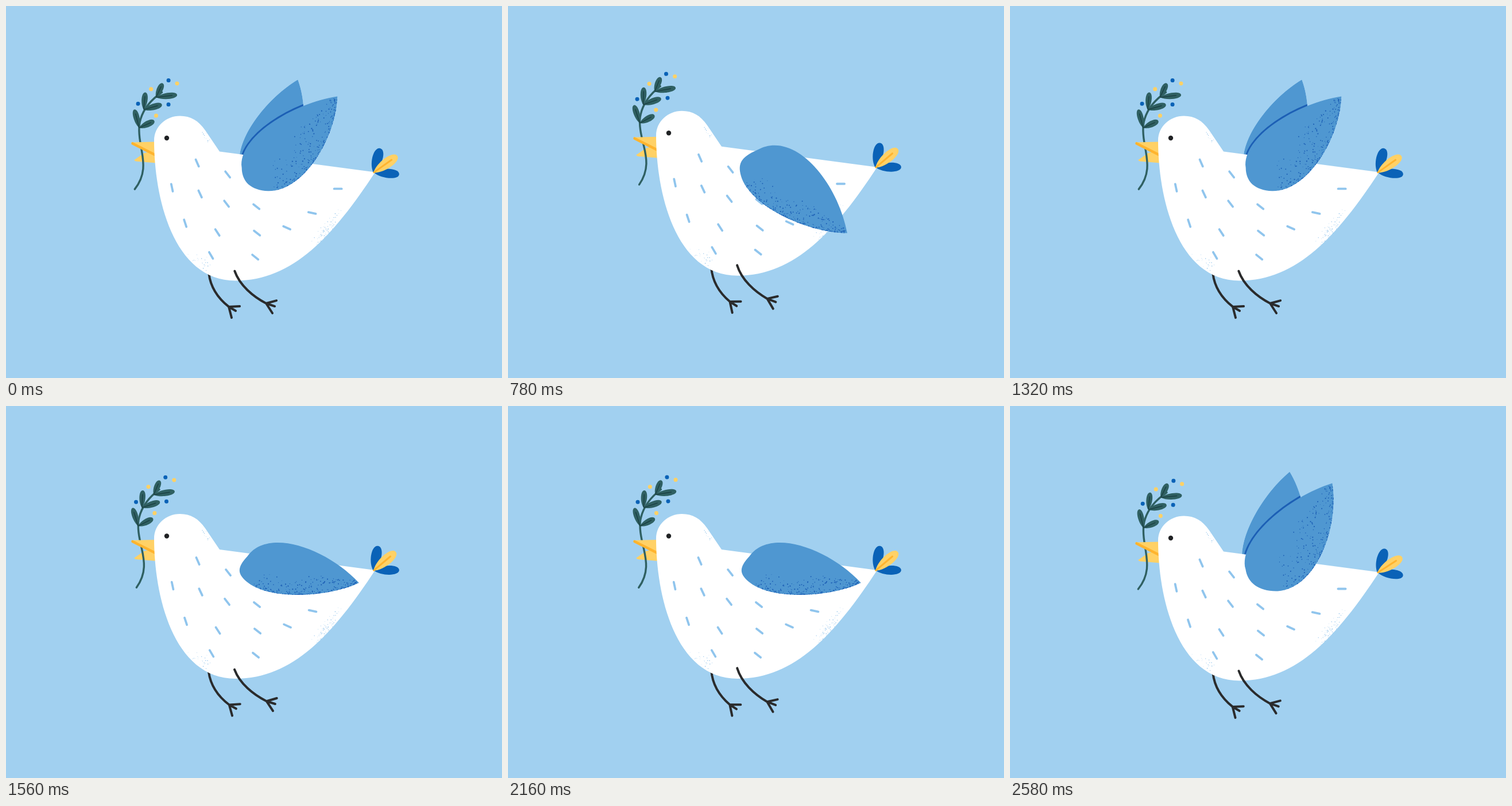
Recreate the animation shown at these times as an HTML page with a canvas. Size 864 by 648 pixels, loop 2.64 s.

```html
<!DOCTYPE html>
<html lang="en">
<head>
<meta charset="utf-8">
<title>Bird with a twig</title>
<style>
  html, body { margin: 0; height: 100%; overflow: hidden; background: #a1d0f0; }
  canvas { display: block; width: 864px; height: 648px; }
</style>
</head>
<body>
<canvas id="stage" width="864" height="648"></canvas>
<script>
const ctx = document.getElementById('stage').getContext('2d');
const STEP = 60, FRAMES = 44, FLAP = 22;
const RAD = Math.PI / 180;
const SKY = '#a1d0f0', BLUE = '#4f97d1', DEEP = '#0a62b7', LINE = '#1c5fb5';
const YELLOW = '#ffd166', ORANGE = '#ffb42e', LEAF = '#2f6062', VEIN = '#1b4043', INK = '#2a2b2c';

const SHOULDER = [430, 285];
// Wing angle at a few phases of one flap
const FLAP_KEYS = [[0, -41], [4, 8], [10, 42], [13, 36.4], [15, 8], [18, -41], [21, -49]];

const DASHES = [[333, 273], [386, 293], [289, 316], [338, 327], [384, 344], [436, 349], [578, 318],
  [533, 360], [489, 386], [437, 395], [312, 378], [368, 394], [357, 434], [434, 437]];
const JOINTS = [[231, 212], [238, 180], [259, 158]];
const BLUE_BERRIES = [[280, 128], [228, 170], [281, 170]];
const YELLOW_BERRIES = [[295, 133], [250, 144], [260, 190]];

const BODY = new Path2D('M643 289L372 253L347 216C335 199 322 191 303 191C279 191 258 209 258 234' +
  'C258 330 290 478 400 478C500 478 570 400 643 289Z');

let seed = 11;
const rnd = () => (seed = (seed * 16807) % 2147483647) / 2147483647;
const bell = () => rnd() + rnd() + rnd() - 1.5;

const wingSpecks = Array.from({ length: 260 }, () => ({
  t: 0.06 + 0.92 * Math.pow(rnd(), 0.8), depth: Math.pow(rnd(), 2.6), r: 0.4 + 0.75 * rnd()
}));
const bodySpecks = [];
function cluster(n, x, y, angle, along, across) {
  const c = Math.cos(angle * RAD), s = Math.sin(angle * RAD);
  for (let i = 0; i < n; i++) {
    const a = bell() * along, b = bell() * across;
    bodySpecks.push([x + a * c - b * s, y + a * s + b * c, 0.35 + 0.4 * rnd()]);
  }
}
cluster(70, 561, 388, -47, 32, 12);
cluster(10, 350, 229, 56, 20, 5);
cluster(24, 338, 446, 42, 22, 11);

const wave = (phase, peak, period) => Math.cos(2 * Math.PI * (phase - peak) / period);

// Smooth cyclic curve through the flap keys
function wingAngle(phase) {
  const n = FLAP_KEYS.length;
  const key = i => {
    const turn = Math.floor(i / n), [p, a] = FLAP_KEYS[i - turn * n];
    return [p + turn * FLAP, a];
  };
  const slope = i => {
    const [p, a] = key(i - 1), [q, b] = key(i + 1);
    return (b - a) / (q - p);
  };
  let i = n - 1;
  while (key(i)[0] > phase) i--;
  const [p, a] = key(i), [q, b] = key(i + 1), h = q - p, u = (phase - p) / h;
  return a + (b - a) * u * u * (3 - 2 * u) +
    h * u * (1 - u) * (slope(i) * (1 - u) - slope(i + 1) * u);
}

function fill(path, color) {
  ctx.fillStyle = color;
  ctx.fill(typeof path === 'string' ? new Path2D(path) : path);
}

function stroke(path, color, width) {
  ctx.strokeStyle = color;
  ctx.lineWidth = width;
  ctx.stroke(typeof path === 'string' ? new Path2D(path) : path);
}

function dot(x, y, r, color) {
  ctx.fillStyle = color;
  ctx.beginPath();
  ctx.arc(x, y, r, 0, 7);
  ctx.fill();
}

// Draw with the origin at x, y and turned by deg
function at(x, y, deg, draw) {
  ctx.save();
  ctx.translate(x, y);
  ctx.rotate(deg * RAD);
  draw();
  ctx.restore();
}

const around = (x, y, deg, draw) => at(x, y, deg, () => {
  ctx.translate(-x, -y);
  draw();
});

function petal(x, y, deg, len, width, color, vein, veinWidth = 1.5) {
  const k = width / 1.5;
  at(x, y, deg, () => {
    fill(`M0 0C${len * 0.3} ${-k} ${len} ${-k} ${len} 0C${len} ${k} ${len * 0.3} ${k} 0 0Z`, color);
    if (vein) stroke(`M1 0H${len * 0.76}`, vein, veinWidth);
  });
}

// Wing lying along the x axis; up and low are the bulges of its two edges
function wingPath(len, up, low) {
  const path = new Path2D();
  path.moveTo(len, 0);
  path.bezierCurveTo(0.66 * len, -0.7 * up, 0.09 * len, -up, -12, -0.26 * up);
  path.bezierCurveTo(-28, 0.05 * up, -26, 0.28 * low, -4, 0.52 * low);
  path.bezierCurveTo(0.22 * len, low, 0.75 * len, 0.6 * low, len, 0);
  return path;
}

function speckle(len, low) {
  const xs = [-4, 0.22 * len, 0.75 * len, len], ys = [0.52 * low, low, 0.6 * low, 0];
  const point = ([a, b, c, d], t, s = 1 - t) => s * s * s * a + 3 * s * s * t * b + 3 * s * t * t * c + t * t * t * d;
  const rate = ([a, b, c, d], t, s = 1 - t) => s * s * (b - a) + 2 * s * t * (c - b) + t * t * (d - c);
  for (const { t, depth, r } of wingSpecks) {
    const dx = rate(xs, t), dy = rate(ys, t);
    const k = 0.6 * low * depth * Math.min(1, 2.5 * (1 - t) + 0.15) / Math.hypot(dx, dy);
    dot(point(xs, t) + dy * k, point(ys, t) - dx * k, r, LINE);
  }
}

function twig() {
  stroke('M226 319C247 291 239 266 235 244C231 226 229 210 233 197C238 178 251 162 269 149', LEAF, 3.4);
  JOINTS.forEach(([x, y], i) => {
    petal(x, y, -106 + 20 * i, 33 - 3 * i, 10.5, LEAF, VEIN);
    petal(x, y, -26 + 9 * i, 29 + 4 * i, 11, LEAF, VEIN);
  });
  BLUE_BERRIES.forEach(([x, y]) => dot(x, y, 3.5, DEEP));
  YELLOW_BERRIES.forEach(([x, y]) => dot(x, y, 3.5, YELLOW));
}

function tail() {
  petal(640, 290, -75, 44, 18, DEEP);
  petal(640, 289, 4, 45, 16, DEEP);
  petal(640, 290, -36, 51, 18, YELLOW, ORANGE, 3);
}

function plumage(shift) {
  ctx.save();
  ctx.clip(BODY);
  bodySpecks.forEach(([x, y, r]) => dot(x, y, r, '#7db8e6'));
  DASHES.forEach(([x, y]) =>
    at(x + shift, y, 78 - 0.27 * (x - 289), () => stroke('M-6.5 0H6.5', '#90c5ed', 3.8)));
  ctx.restore();
}

function bird(phase, blink) {
  const angle = wingAngle(phase);
  const drop = Math.max(0, (angle + 50) / 92);
  const fan = Math.max(0, Math.min(1, (8 - angle) / 49));

  // The wing is foreshortened as it passes the level pose
  const len = 182 + 70 * (drop - 0.52) ** 2 + 6 * drop;
  const up = 60 + 34 * drop ** 2;
  const low = 52 + 120 * (drop - 0.64) ** 2;
  const front = wingPath(len, up, low), back = wingPath(0.9 * len, 0.9 * up, 0.9 * low);

  const kick = wave(phase, 4, FLAP), flutter = wave(phase, 19.5, FLAP / 2);
  const leg = (x, y, path) => at(0.6 * (1 - kick), -1.2 * (1 - kick), 0, () =>
    around(x, y, 1 - 1.8 * kick, () => stroke(path, INK, 4)));

  ctx.save();
  ctx.translate(0, 0.5 - 10.1 * drop ** 2.3);

  at(...SHOULDER, angle - 22.5 * fan, () => fill(back, BLUE));
  if (fan) {
    ctx.save();
    at(...SHOULDER, angle, () => stroke(front, LINE, 6));
    ctx.restore();
    edgeOff(back, front, angle, fan);
  }

  leg(353, 466, 'M353 466C356 490 370 510 388 524M407 523L388 524L400 531M388 524L393 543');
  fill('M223 268L240 256L262 250V273L226 270Z', YELLOW);
  around(238, 250, 1.3 * wave(phase, 21, FLAP) + 1.5 * flutter, twig);
  fill('M218 237L262 236V261Z', YELLOW);
  stroke('M220.5 239L260 259', ORANGE, 4.6);

  fill(BODY, '#fff');
  around(640, 290, 5 * flutter, tail);
  plumage(1.7 * drop);

  if (blink) stroke('M275.5 228.5Q280 230.5 284 228.5', INK, 3.6);
  else dot(280, 229.5, 4.2, '#202224');

  at(...SHOULDER, angle, () => {
    fill(front, BLUE);
    ctx.clip(front);
    speckle(len, low);
  });
  leg(398, 462, 'M398 462C407 487 430 506 453 518M471 513L453 518L468 523M453 518L464 535');
  ctx.restore();
}

// Keep the front wing's dark edge only where it crosses the back wing
function edgeOff(back, front, angle, fan) {
  const outside = new Path2D();
  outside.rect(-900, -900, 1800, 1800);
  outside.addPath(back);
  at(...SHOULDER, angle - 22.5 * fan, () => fillEvenOdd(outside, SKY));
}

function fillEvenOdd(path, color) {
  ctx.fillStyle = color;
  ctx.fill(path, 'evenodd');
}

function draw(now) {
  const n = Math.floor(now / STEP) % FRAMES;
  // The second upstroke comes one step early and ends on a held pose
  const early = n >= 32 && n <= 40 ? 1 : 0;
  ctx.lineCap = ctx.lineJoin = 'round';
  ctx.fillStyle = SKY;
  ctx.fillRect(0, 0, 864, 648);
  bird(n % FLAP + early, n >= 5 && n <= 7);
}

let start;
function tick(now) {
  if (start === undefined) start = now;
  draw(now - start);
  requestAnimationFrame(tick);
}
draw(0);
requestAnimationFrame(tick);
</script>
</body>
</html>
```
